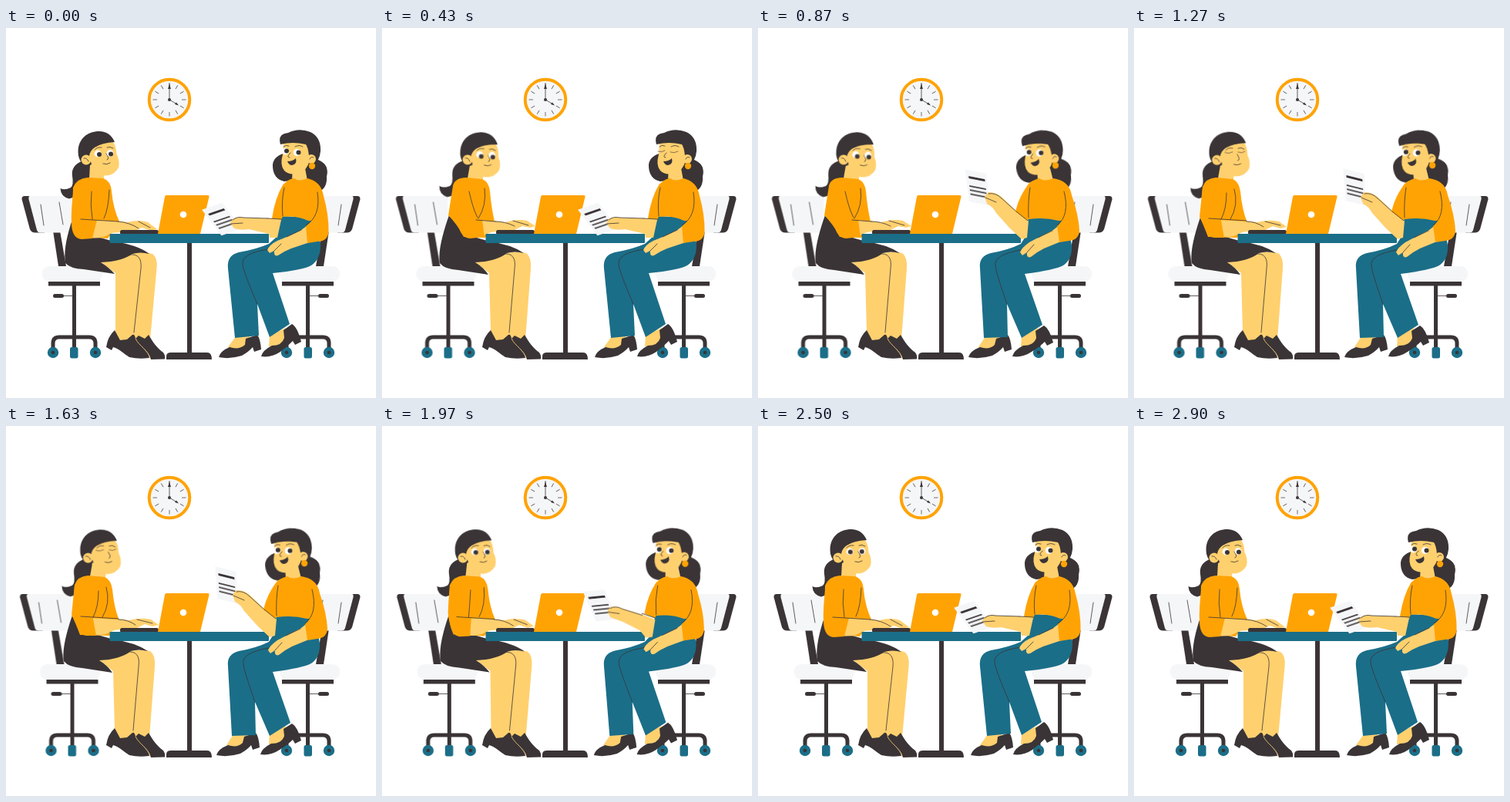
Recreate the animation shown at these times as an HTML page without scripts. Size 480x480 px, loop 3.03 s.

```html
<!DOCTYPE html>
<html lang="en">
<head>
<meta charset="utf-8">
<title>Desk meeting</title>
<style>
html, body { margin: 0; width: 100%; height: 100%; overflow: hidden; background: #fff; }
svg { display: block; width: 100vw; height: 100vh; }
.o { fill: #ffa305; }
.d { fill: #3a3436; }
.s { fill: #ffd06e; }
.t { fill: #1b6e88; }
.p { fill: #f5f6f8; }
.w { fill: #fff; }
.ln { fill: none; stroke: #3a3436; stroke-width: .8; stroke-linecap: round; stroke-linejoin: round; }
.lean, .sit, .talk { d: var(--a); }
.lean, .sit, .talk, .headL, .headR, .chair, .paper, .dip, .look, .open, .shut {
  animation: 3.03s ease-in-out infinite;
}
.lean { animation-name: lean; }
.sit { animation-name: sit; }
.talk { animation-name: talk; }
.headL { animation-name: headL; transform-origin: 122px 165px; }
.headR { animation-name: headR; transform-origin: 376px 165px; }
.chair { animation-name: chair; }
.paper { animation-name: paper; }
.dip { animation-name: dip; }
.look { animation-name: look; }
.open, .shut { animation-timing-function: step-end; }
.headL .open { animation-name: openL; }
.headL .shut { animation-name: shutL; }
.headR .open { animation-name: openR; }
.headR .shut { animation-name: shutR; }
.shut { opacity: 0; stroke-width: .6; }

@keyframes lean {
  0%, 74.6%, 100% { d: var(--a); }
  13.2%, 31.4% { d: var(--b); }
  41.9%, 54% { d: var(--c); }
}
@keyframes sit {
  0%, 75.5%, 100% { d: var(--a); }
  13.2%, 54.5% { d: var(--b); }
}
@keyframes talk {
  0%, 16.5%, 73.6%, 100% { d: var(--a); }
  27.7%, 54.8% { d: var(--b); }
}
@keyframes headL {
  0%, 74.6%, 100% { transform: none; }
  13.2%, 31.4% { transform: translate(7.5px, 1.5px) rotate(5deg); }
  41.9% { transform: translate(3.8px, .8px) rotate(1.5deg); }
  54% { transform: translate(2.6px, .5px) rotate(1deg); }
}
@keyframes headR {
  0%, 16.5%, 82%, 100% { transform: none; }
  27.7% { transform: translate(-12px, .8px) rotate(-4deg); }
  41%, 54.8% { transform: translate(-10.8px, .6px) rotate(-4deg); }
  73.6% { transform: translate(.8px, 0); }
}
@keyframes chair {
  0%, 75.5%, 100% { transform: none; }
  13.2%, 54.5% { transform: translate(-2.5px, 0); }
}
@keyframes paper {
  0%, 16.5%, 82%, 100% { transform: translate(280px, 248px) rotate(-19deg); }
  27.7% { transform: translate(285px, 207px) rotate(11deg); }
  41%, 54.8% { transform: translate(286.5px, 206.5px) rotate(14deg); }
  73.6% { transform: translate(280.5px, 252px) rotate(-20deg); }
}
@keyframes dip {
  0%, 54.8%, 82%, 100% { transform: none; }
  73.6% { transform: translate(0, 3px); }
}
@keyframes look {
  0%, 60%, 100% { transform: none; }
  13.2%, 31.4% { transform: translate(.3px, 1.2px); }
  74% { transform: translate(-1.6px, -.8px); }
}
@keyframes openL { 0%, 56.5% { opacity: 1; } 40% { opacity: 0; } }
@keyframes shutL { 0%, 56.5% { opacity: 0; } 40% { opacity: 1; } }
@keyframes openR { 0%, 16.5% { opacity: 1; } 12.5% { opacity: 0; } }
@keyframes shutR { 0%, 16.5% { opacity: 0; } 12.5% { opacity: 1; } }
</style>
</head>
<body>
<svg viewBox="0 0 480 480">
  <defs>
    <path id="tick" d="M212 71.500v5.500" stroke="#3a3436" stroke-width=".7"/>
    <g id="ticks">
      <use href="#tick" transform="rotate(30 212 93)"/>
      <use href="#tick" transform="rotate(60 212 93)"/>
      <use href="#tick" transform="rotate(90 212 93)"/>
    </g>
    <g id="wheel">
      <circle class="t" cy="421" r="7.200"/>
      <circle class="d" cy="421" r="2.300"/>
    </g>
    <g id="seat">
      <path class="d" d="M61 263H70L78 309H68Z"/>
      <path class="d" d="M24 218H40L50 265.500H38Q33 265.500 31 261L20.500 222Q20.500 218 24 218Z"/>
      <path class="p" d="M31 218H84Q88 218 88 222V262Q88 265.500 84 265.500H45Q41 265.500 40 262L29.500 222Q29 218 31 218Z"/>
      <path class="ln" d="M45 229L49 256M69 226L74 255"/>
      <rect class="p" x="47" y="309" width="78" height="20" rx="9"/>
      <path class="d" d="M55 329H122V334.500H55ZM86 334H91V415H86Z"/>
      <path class="ln" d="M74 347.500H88"/>
      <rect class="d" x="61" y="345" width="14" height="5" rx="2.500"/>
      <path d="M61 415V409Q61 401 69 401H108Q116 401 116 409V415" fill="none" stroke="#3a3436" stroke-width="5"/>
      <use href="#wheel" x="61"/>
      <use href="#wheel" x="116"/>
      <rect class="t" x="83" y="414" width="10.500" height="14.500" rx="2.500"/>
    </g>
  </defs>

  <!-- clock -->
  <circle cx="212" cy="93" r="26.300" fill="#f5f6f8" stroke="#ffa305" stroke-width="4"/>
  <use href="#tick"/>
  <use href="#ticks"/>
  <use href="#ticks" transform="rotate(90 212 93)"/>
  <use href="#ticks" transform="rotate(180 212 93)"/>
  <use href="#ticks" transform="rotate(270 212 93)"/>
  <path class="ln" d="M212 93V76M212 93L222 99"/>
  <path class="d" d="M212 73L214 79H210ZM224 100.500L219 99L221 96.500Z"/>
  <circle class="d" cx="212" cy="93" r="2"/>

  <g class="chair"><use href="#seat"/></g>
  <use href="#seat" transform="translate(480) scale(-1 1)"/>

  <!-- woman on the left -->
  <path class="s sit" style="
    --a:path('M121 302L150 296Q172 288 190 293Q197 298 195.500 312L187 404L168 405L146 405L142 394L142 318Z');
    --b:path('M119 302L148 296Q170 288 187 292Q194 297 193 312L186 404L168 405L146 405L141 394L139 318Z')"/>
  <path class="ln sit" style="
    --a:path('M160 294Q177 292 175 312L166 395');
    --b:path('M157 293Q175 291 172 312L165 395')"/>
  <path class="d" d="M141 392Q132 400 130 414L137 418L139 414C147 416 152 422 160 427Q172 430 186 428C186 421 175 414 168 403Q167 397 164 398L157 404L148 405Z"/>
  <path class="d" d="M168 403L172 399L180 403L185 398C190 407 196 415 204 421Q207 425 206 429.500L188 430C185 419 173 413 168 403Z"/>
  <path d="M168 403C173 413 185 418 187 429" fill="none" stroke="#ffd06e" stroke-width=".8"/>
  <path class="d sit" style="
    --a:path('M87 246C81 262 74 288 77 305Q83 312 101 313L141 319Q134 311 123 304Q150 303 164 293Q174 290 186 293Q170 281 140 277L112 269Z');
    --b:path('M87 243C81 260 72 288 75 305Q81 313 99 314L138 320Q132 311 121 304Q148 303 162 292Q172 289 184 292Q168 281 140 277L112 269Z')"/>
  <g class="headL">
    <path class="d" d="M100 172Q84 178 86 192Q88 204 84 207Q76 211 70.500 208Q71 219 82 221.500Q92 219 97 208Q104 197 112 190V175Z"/>
  </g>
  <path class="s lean" style="
    --a:path('M109 178L127 184L127 196Q117 199 108 195Z');
    --b:path('M114 178L132 186L131 197Q121 200 111 195Z');
    --c:path('M112 178L130 185L129 197Q119 200 109 195Z')"/>
  <path class="s lean" style="
    --a:path('M132 249L158 252Q172 248 184 252L196 261L188 263L176 259L166 264L134 266Z');
    --b:path('M136 249L160 252Q176 247 188 250L199 257L192 259L182 257L172 262L138 265Z');
    --c:path('M134 249L160 252Q174 248 188 251L198 258L190 260L180 257L170 262L136 265Z')"/>
  <path class="o lean" style="
    --a:path('M87 207Q92 195 106 194L126 195Q136 198 137 212Q139 234 147 251L132 273L90 270Q84 255 86 240Z');
    --b:path('M92 205Q94 195 108 194L130 196Q139 200 140 212Q142 234 146 251L134 272L106 271Q98 255 86 243Z');
    --c:path('M89 206Q93 195 106 194L128 196Q136 199 138 212Q140 234 146 250L134 272L96 271Q90 255 85 245Z')"/>
  <path class="s lean" style="
    --a:path('M113 249L145 251Q160 252 172 260L164 262L150 261Q140 265 133 268Q124 274 108 272Z');
    --b:path('M128 249L147 251Q160 251 172 257L164 261L150 261Q140 266 134 268Q132 271 128 270Z');
    --c:path('M110 249L146 251Q158 251 168 258L162 261L150 261Q140 265 134 268Q127 272 112 271Z')"/>
  <path class="o lean" style="
    --a:path('M88 207Q84 235 85 255Q86 273 98 274L112 273L118 249L111 212Z');
    --b:path('M92 207Q92 235 99 255Q102 272 114 273L133 271L130 249L126 212Z');
    --c:path('M89 207Q86 235 91 250Q95 271 104 272L117 272L113 250L120 212Z')"/>
  <path class="ln lean" style="
    --a:path('M111 212Q109 230 112 248M97 248L145 251M134 210Q133 235 127 247M145 251Q160 252 172 260M172 251L187 259');
    --b:path('M113 212Q118 235 124 246M122 249L147 251M133 208Q136 230 125 247M147 251Q160 251 172 257M170 250L190 256');
    --c:path('M120 214Q120 235 113 248M97 247L146 250M130 209Q136 230 125 248M146 251Q158 251 168 258M170 251L190 256')"/>
  <g class="headL">
    <path class="s" d="M102 160Q108 147 138 147Q143 152 143.500 164Q148 172 146 181Q141 191 129 191.500Q116 191 110 180Z"/>
    <path class="d" d="M94 166C91 146 104 134 121 134Q135 134 141 148Q124 149 115 155Q109 159 108 166L111 177L104 180Q96 175 94 166Z"/>
    <circle class="s" cx="104" cy="171" r="6.500"/>
    <path class="ln" d="M101 169Q105 168 107 173M115 158Q118 154 124 155M131 155Q135 153 139 156M130 163Q135 170 131 171M126 176Q131 178 135 175"/>
    <g class="open">
      <circle class="w" cx="119" cy="163" r="4.400"/>
      <circle class="w" cx="135" cy="162.500" r="4.400"/>
      <g class="look">
        <circle class="d" cx="121" cy="164" r="3"/>
        <circle class="d" cx="136" cy="163.500" r="3"/>
      </g>
    </g>
    <path class="ln shut" d="M114 161Q119 163 124 160M131 160Q136 162 140 159"/>
  </g>

  <!-- table and laptop -->
  <rect class="d" x="148" y="262" width="50" height="6" rx="2.500"/>
  <path class="o" d="M208 217H262Q264 217 263.500 219L252 267H197L206 219Q206.500 217 208 217Z"/>
  <circle class="w" cx="230" cy="242" r="4.300"/>
  <path class="d" d="M235 278H241V422H235ZM208 430V426Q208 421 214 421H261Q267 421 267 430Z"/>

  <!-- woman on the right -->
  <g class="headR">
    <path class="d" d="M362 162Q345 167 346 180Q347 196 361 199L386 196Q399 198 404 213Q417 209 416 193Q420 177 405 171L398 150Z"/>
  </g>
  <path class="s talk" style="
    --a:path('M298 400L316 400L314 412Q300 420 288 414Z');
    --b:path('M295 400L313 400L312 412Q298 420 286 414Z')"/>
  <path class="d talk" style="
    --a:path('M276 427Q278 419 290 414Q302 418 310 411L311 403L326 398Q330 403 331 417L322 420L320 414Q315 420 306 425Q290 430 276 427Z');
    --b:path('M273 427Q275 419 288 414Q300 418 307 411L309 403L324 398Q328 403 329 417L320 420L318 414Q313 420 304 425Q288 430 273 427Z')"/>
  <path class="s" d="M342 399L363 389V402Q354 415 341 413Z"/>
  <path class="d talk" style="
    --a:path('M331 426Q333 418 345 412Q358 412 361 402L360 392L371 384Q378 388 383 407L375 411L372 406Q366 412 356 420Q344 428 331 426Z');
    --b:path('M330 426Q332 418 344 412Q358 412 361 402L360 393L371 386Q378 390 383 408L375 412L372 407Q366 413 355 420Q343 428 330 426Z')"/>
  <path class="t talk" style="
    --a:path('M358 244L393 246Q406 262 408 282Q408 300 396 308Q385 314 346 318L368 384L342 401L326 358L328 399L297 402L288 312Q286 295 302 291Q325 287 341 280L350 272Z');
    --b:path('M351 244L391 246Q405 262 407 282Q408 300 396 308Q385 314 346 319L369 385L342 402L323 358L324 401L293 402L288 312Q286 296 302 292Q325 288 341 280L346 272Z')"/>
  <path class="ln talk" style="
    --a:path('M341 287Q305 292 307 307Q308 316 326 358');
    --b:path('M341 288Q305 294 308 309Q309 318 323 358')"/>
  <rect class="t" x="134.500" y="267" width="206.500" height="12" rx="1"/>
  <path class="s talk" style="
    --a:path('M372 180L388 182L391 198Q380 202 371 198Z');
    --b:path('M362 181L379 182L383 198Q372 202 363 198Z')"/>
  <path class="o talk" style="
    --a:path('M358 206Q364 196 374 195Q380 200 391 195Q408 199 411 215L414 250L392 250Q376 243 358 245L357 222Z');
    --b:path('M349 205Q355 197 365 195Q372 200 383 195Q402 198 406 214L411 250L390 250Q372 245 351 248L350 222Z')"/>
  <g class="paper">
    <g transform="skewX(18)">
      <path class="p" d="M-14 -20H14V20H-14Z"/>
      <path class="d" d="M-10.500 -12.500H11V-9.500H-10.500ZM-11 -.8H11V1H-11ZM-11 4.200H11V6H-11ZM-11 9.200H11V11H-11Z"/>
    </g>
  </g>
  <!-- forearm runs back to a bare elbow -->
  <g class="dip">
    <path class="s talk" style="
      --a:path('M343 247L309 246Q300 244 294 248L291 253L296 260Q305 263 315 261L341 267L342 272L352 272L357 249Z');
      --b:path('M338 240L318 221Q310 213 299 213L294 219L297 228Q304 231 309 240L326 259L342 274L349 272L351 250Z')"/>
    <path class="ln talk" style="
      --a:path('M339 247L308 246Q300 244 294 249M292 254L307 253');
      --b:path('M336 239L316 221Q308 213 299 215M295 220L309 226')"/>
  </g>
  <path class="o talk" style="
    --a:path('M360 202Q349 220 345 247L357 249L361 240Z');
    --b:path('M352 201Q339 217 334 238L350 250L354 238Z')"/>
  <path class="ln talk" style="
    --a:path('M339 247L357 248M361 207Q357 225 359 244');
    --b:path('M335 238L350 250M353 207Q350 225 351 246')"/>
  <path class="s talk" style="
    --a:path('M394 254L383 262Q365 271 352 276Q342 281 339 288L342 292L348 289Q347 297 353 295Q360 290 370 286L394 278Z');
    --b:path('M393 254L383 262Q365 271 352 278Q342 285 340 291L343 295L349 291Q348 299 354 297Q361 291 371 286L393 277Z')"/>
  <path class="o talk" style="
    --a:path('M396 198Q409 202 412 218Q419 243 418.500 265Q417 277 404 277L391 279L389 257Q406 246 403 214Z');
    --b:path('M390 197Q404 201 407 217Q416 243 417 263Q416 275 404 276L391 278L388 257Q402 246 397 214Z')"/>
  <path class="ln talk" style="
    --a:path('M404 213Q409 244 389 256M383 262L364 271M348 289L357 280');
    --b:path('M397 212Q405 243 388 256M382 263L363 272M349 291L358 281')"/>
  <g class="headR">
    <path class="s" d="M360 149Q374 145 393 152L394 172Q390 185 381 188Q368 192 361 185Q355 178 359 164Z"/>
    <path class="d" d="M356 151Q352 137 366 136Q380 129 395 135Q409 142 408 160Q407 172 398 178L393 166Q392 155 389 151Q372 147 356 151Z"/>
    <circle class="s" cx="396" cy="170" r="6"/>
    <circle class="o" cx="397" cy="179" r="4.200"/>
    <path class="ln" d="M394 170Q396 166 399 168M360 154Q363 151 367 153M375 154Q380 151 385 154M369 162Q363 168 368 168"/>
    <path class="d" d="M365 173Q372 173 376 169Q378 177 371 178Q367 178 365 173Z"/>
    <g class="open">
      <circle class="w" cx="362.500" cy="160" r="4.400"/>
      <circle class="w" cx="377.500" cy="161.500" r="4.700"/>
      <circle class="d" cx="364" cy="159.500" r="3"/>
      <circle class="d" cx="379.500" cy="161.500" r="3"/>
    </g>
    <path class="ln shut" d="M358 160Q363 162 367 159M374 161Q379 163 384 160"/>
  </g>
</svg>
</body>
</html>
```
